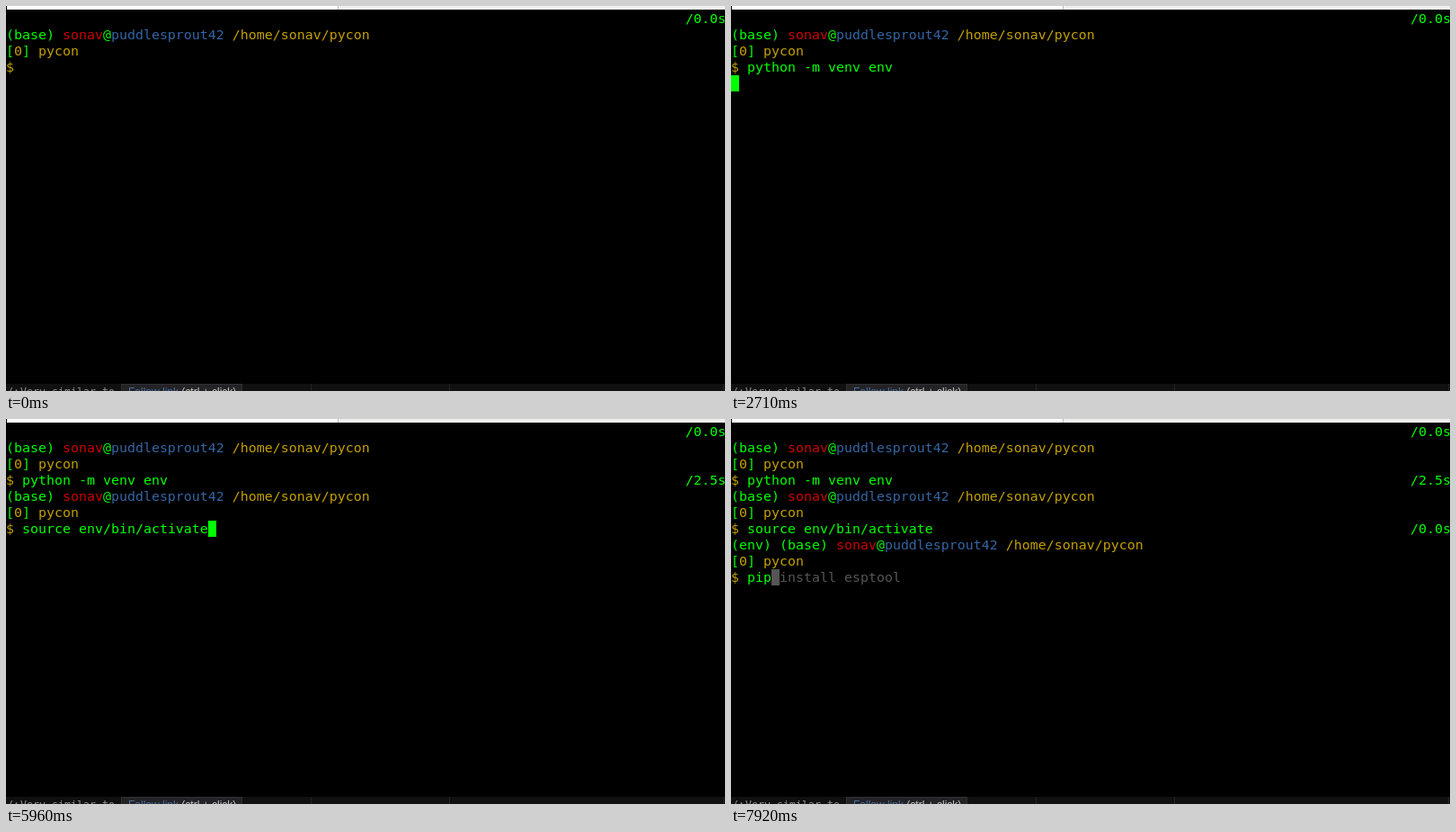
Write an HTML page that moves like this. It is 800 by 428 pixels and loops after 8000 ms.

```html
<!DOCTYPE html>
<html lang="en">
<head>
<meta charset="utf-8">
<title>Terminal session</title>
<style>
  html, body { margin: 0; width: 100%; height: 100%; overflow: hidden; background: #000; }
  svg { display: block; width: 800px; height: 428px; }
  text { white-space: pre; }
  #screen { font: 14.95px "DejaVu Sans Mono", monospace; }
  .note { font: 11.63px "DejaVu Sans Mono", monospace; fill: #8c8c8c; }
  .tip { font: 12px "Liberation Sans", Arial, sans-serif; fill: #c4c4c4; }
</style>
</head>
<body>
<svg viewBox="0 0 800 428">
  <rect width="800" height="428"/>
  <rect x="1" width="368" height="4" fill="#fff"/>
  <rect x="369" width="1" height="4" fill="#b8b8b8"/>
  <rect x="370" width="430" height="4" fill="#f1f1f0"/>
  <g id="screen"></g>
  <rect y="420" width="800" height="8" fill="#111010"/>
  <path d="M339.5 420v8M493.5 420v8M798.5 420v8" stroke="#242222"/>
  <text class="note" x="1" y="433">/:</text>
  <text class="note" x="16" y="433">Very similar to</text>
  <rect x="128" y="420" width="135" height="8" fill="#232326"/>
  <path d="M128.5 428v-7.5h134v7.5" fill="none" stroke="#303034"/>
  <text class="tip" x="136" y="433"><tspan fill="#4a6c9c">Follow link</tspan> (ctrl + click)</text>
</svg>
<script>
const LOOP = 8000, CELL = 9, LINE = 18, TOP = 5, BASE = 14;
const GREEN = '#00ff00', RED = '#cc0000', BLUE = '#3465a4', YELLOW = '#c4a000', GREY = '#555555';
const VENV = 'python -m venv env', ACTIVATE = 'source env/bin/activate', INSTALL = 'pip install esptool';
const screen = document.getElementById('screen');

// Each step: start time, finished commands, command line, typed length, cursor column (-1 hides it).
// The cursor column 'wait' puts it at the start of the line below.
const steps = [
  [0, 0, '', 0, -1],
  [80, 0, '', 0, 2],
  [380, 0, INSTALL, 1, 3],
  [460, 0, VENV, 2, 4],
  [1040, 0, VENV, 2, -1],
  [1210, 0, VENV, 18, 20],
  [1460, 0, VENV, 18, 'wait'],
  [2000, 0, VENV, 18, -1],
  [2710, 0, VENV, 18, 'wait'],
  [3290, 0, VENV, 18, -1],
  [3880, 0, VENV, 18, 'wait'],
  [3960, 1, '', 0, 2],
  [4460, 1, '', 0, -1],
  [4960, 1, ACTIVATE, 1, 3],
  [5130, 1, ACTIVATE, 2, 4],
  [5710, 1, ACTIVATE, 2, -1],
  [5960, 1, ACTIVATE, 23, 25],
  [6500, 2, '', 0, 2],
  [7040, 2, '', 0, -1],
  [7540, 2, VENV, 1, 3],
  [7750, 2, INSTALL, 2, 4],
  [7920, 2, INSTALL, 3, 5]
];
const finished = [[VENV, '/2.5s'], [ACTIVATE, '/0.0s']];

// Draws coloured runs of text one after another from a grid cell.
function write(col, row, ...runs) {
  const spans = runs.map(([text, fill]) => `<tspan fill="${fill}">${text}</tspan>`).join('');
  return `<text x="${col * CELL}" y="${TOP + row * LINE + BASE}">${spans}</text>`;
}

function block(col, row, fill) {
  return `<rect x="${col * CELL}" y="${TOP + row * LINE}" width="${CELL}" height="${LINE}" fill="${fill}"/>`;
}

function prompt(row, env) {
  return write(0, row, [env + '(base) ', GREEN], ['sonav', RED], ['@', GREEN],
      ['puddlesprout42', BLUE], [' /home/sonav/pycon', YELLOW]) +
    write(0, row + 1, ['[', GREEN], ['0', YELLOW], ['] ', GREEN], ['pycon', YELLOW]) +
    write(0, row + 2, ['$', YELLOW]);
}

function draw([, done, line, typed, cursor]) {
  let out = write(84, 0, ['/0.0s', GREEN]);
  for (let i = 0; i <= done; i++) {
    out += prompt(1 + i * 3, i === 2 ? '(env) ' : '');
    if (i < done) {
      const [command, duration] = finished[i];
      out += write(2, 3 + i * 3, [command, GREEN]) + write(84, 3 + i * 3, [duration, GREEN]);
    }
  }
  const row = 3 + done * 3;
  out += write(2, row, [line.slice(0, typed), GREEN], [line.slice(typed), GREY]);
  if (cursor === 'wait') {
    out += block(0, row + 1, GREEN);
  } else if (cursor >= 0) {
    const under = line[cursor - 2];
    out += block(cursor, row, under ? GREY : GREEN);
    if (under) out += write(cursor, row, [under, '#000']);
  }
  screen.innerHTML = out;
}

let shown;
function tick() {
  const time = performance.now() % LOOP;
  const step = steps.findLast(([start]) => start <= time);
  if (step !== shown) draw(shown = step);
  requestAnimationFrame(tick);
}
tick();
</script>
</body>
</html>
```
